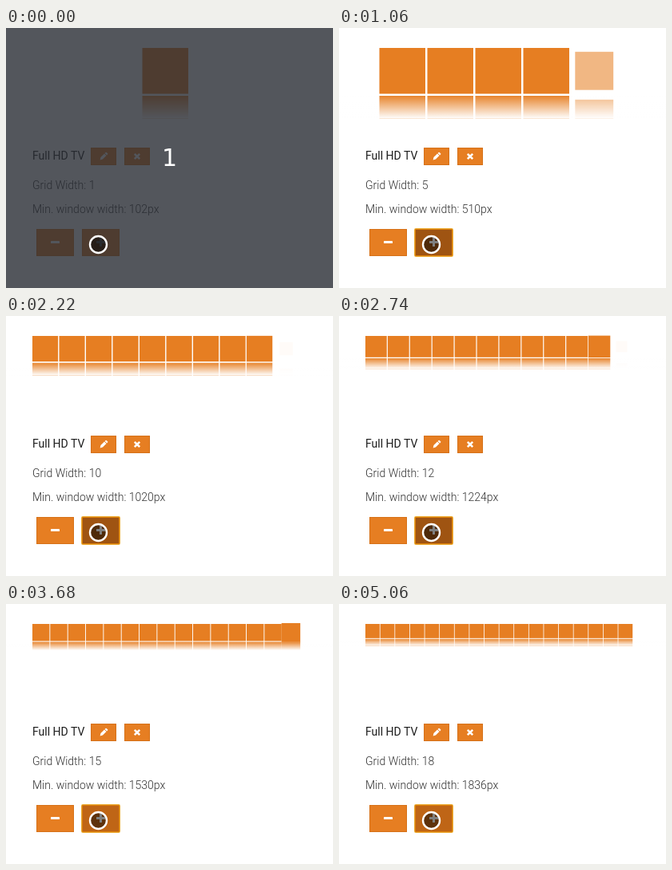
These frames come from a looping animation (409x326 px, 6.22 s). An HTML page with a canvas:

```html
<!DOCTYPE html>
<html lang="en">
<head>
<meta charset="utf-8">
<title>Grid width</title>
<style>
  html, body { margin: 0; width: 100%; height: 100%; overflow: hidden; background: #fff; }
  canvas, svg { position: absolute; left: 0; top: 0; width: 409px; height: 326px; }
  text { font: 300 14px Roboto, sans-serif; fill: #333; white-space: pre; }
  .title { font-weight: 400; fill: #1c1c1c; }
  .count { font: 30px "DejaVu Sans", sans-serif; fill: #fff; text-anchor: middle; }
  .btn { fill: #e67e22; stroke: #d67118; }
  .icon { fill: #fff; }
</style>
</head>
<body>
<canvas id="stage" width="409" height="326"></canvas>
<svg viewBox="0 0 409 326">
  <text class="title" x="33" y="165">Full HD TV</text>
  <text id="grid" x="33" y="202"></text>
  <text id="min" x="33" y="232"></text>

  <rect class="btn" x="106.5" y="150.5" width="31" height="21"/>
  <g class="icon" transform="translate(122 161) rotate(45)">
    <path d="M-1.8-3.2H1.8V3.2L0 6.2L-1.8 3.2Z"/>
    <path d="M-1.8-4V-5.4Q-1.8-6.2-1-6.2H1Q1.8-6.2 1.8-5.4V-4Z"/>
  </g>
  <rect class="btn" x="148.5" y="150.5" width="31" height="21"/>
  <path d="M160.8 157.8L167.2 164.2M167.2 157.8L160.8 164.2" stroke="#fff" stroke-width="2.6"/>

  <rect class="btn" x="38.5" y="252.5" width="46" height="33"/>
  <rect class="icon" x="56" y="267" width="11" height="3" rx=".6"/>

  <rect id="plus" class="btn" x="95.5" y="252.5" width="46" height="33"/>
  <rect id="focus" x="94.75" y="251.75" width="47.5" height="34.5" rx="1.5" fill="none"
        stroke="#e59700" stroke-width="1.5" stroke-opacity=".8"/>
  <path d="M113 268.5H124M118.5 263V274" stroke="#fff" stroke-width="3"/>

  <g id="intro">
    <rect width="409" height="326" fill="#282c34" fill-opacity=".8"/>
    <text class="count" x="204.5" y="173">1</text>
  </g>
  <circle cx="115.5" cy="271.5" r="10.5" fill="#000" fill-opacity=".5" stroke="#fff" stroke-width="2.4"/>
</svg>
<script>
const LOOP = 6220, LEFT = 33, TOP = 25, WIDTH = 335, MAX_PITCH = 60;
const INTRO = 20, PRESS = 140, ENTER = 300, PEAK = 200;
// click times; each adds one column to the first
const clicks = [200, 430, 730, 950, 1170, 1390, 1650, 1930, 2215, 2470, 2735,
                3000, 3250, 3480, 3825, 4160, 4760];

const $ = id => document.getElementById(id);
const ctx = $('stage').getContext('2d');

function show(el, on) {
  el.style.display = on ? '' : 'none';
}

// scale and opacity of a column that appeared `age` ms ago
function enter(age) {
  if (age >= ENTER) return { scale: 1, alpha: 1 };
  if (age >= PEAK) return { scale: 1.1 - 0.1 * (age - PEAK) / (ENTER - PEAK), alpha: 1 };
  const p = age / PEAK;
  return { scale: 0.5 + 0.6 * p, alpha: p };
}

function drawTiles(n, t) {
  const pitch = Math.min(MAX_PITCH, WIDTH / n);
  const size = pitch * 0.958;
  const left = LEFT + (WIDTH - n * pitch) / 2;
  const floor = TOP + pitch;
  const axis = TOP + (size + pitch) / 2;

  function row(mirror) {
    ctx.fillStyle = n === 3 ? '#ff0000' : '#e67e22';
    for (let i = 0; i < n; i++) {
      const { scale, alpha } = enter(i ? t - clicks[i - 1] : ENTER);
      const side = size * scale;
      const cx = left + i * pitch + size / 2;
      const cy = TOP + size / 2;
      ctx.globalAlpha = alpha;
      ctx.fillRect(cx - side / 2, (mirror ? 2 * axis - cy : cy) - side / 2, side, side);
    }
    ctx.globalAlpha = 1;
  }

  ctx.clearRect(0, 0, 409, 326);
  ctx.save();
  ctx.beginPath();
  ctx.rect(0, floor, 409, size / 2);
  ctx.clip();
  row(true);
  const fade = ctx.createLinearGradient(0, floor, 0, floor + size / 2);
  fade.addColorStop(0, 'rgba(255,255,255,.05)');
  fade.addColorStop(1, '#fff');
  ctx.fillStyle = fade;
  ctx.fillRect(0, floor, 409, size);
  ctx.restore();
  row(false);
}

function render(t) {
  const n = 1 + clicks.filter(c => c <= t).length;
  const pressed = clicks.some(c => t >= Math.max(160, c - PRESS) && t < c + 15);
  drawTiles(n, t);
  $('grid').textContent = 'Grid Width: ' + n;
  $('min').textContent = 'Min. window width: ' + n * 102 + 'px';
  $('plus').style.fill = t < INTRO ? '' : pressed ? '#9f5412' : '#bf6516';
  show($('focus'), t >= 160);
  show($('intro'), t < INTRO);
}

const start = performance.now();
function tick() {
  render((performance.now() - start) % LOOP);
  requestAnimationFrame(tick);
}
tick();
</script>
</body>
</html>
```
